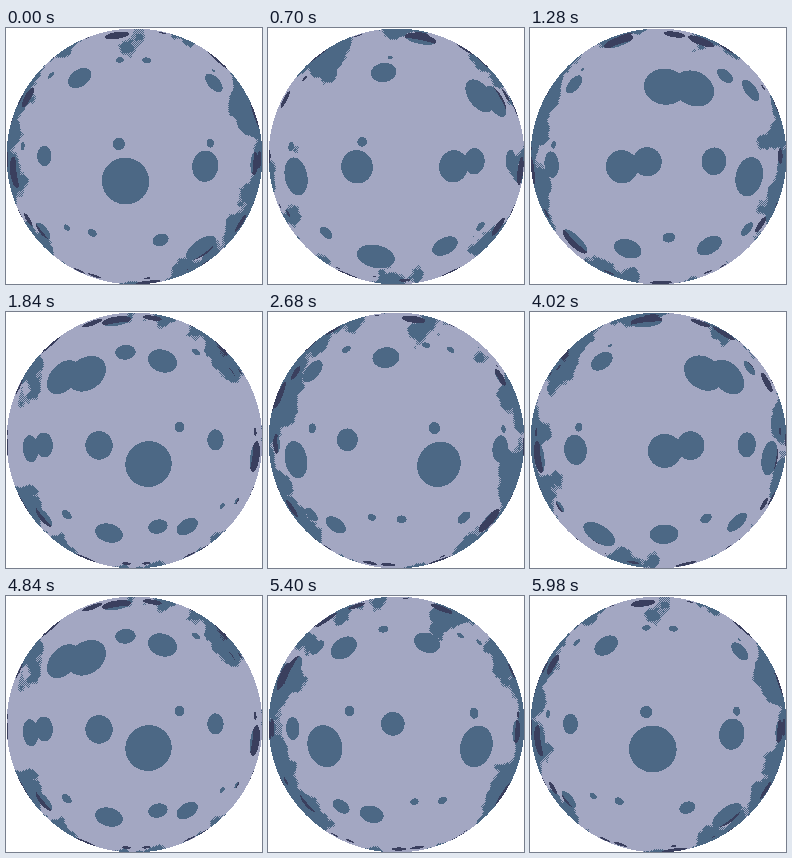
An HTML page with a canvas for the animation above (6 s loop, 256 by 256 pixels).

```html
<!DOCTYPE html>
<html lang="en">
<head>
<meta charset="utf-8">
<title>Rotating moon</title>
<style>
  html, body { margin: 0; height: 100%; overflow: hidden; background: #fff; }
  canvas { display: block; width: 100vw; height: 100vh; image-rendering: pixelated; }
</style>
</head>
<body>
<canvas id="stage" width="256" height="256"></canvas>
<script>
const SIZE = 256, LOOP = 6000, STEP = 20;
const SEED = 8.97;
const GROUND = 8, CRATERS = 5;          // tiles across the disc
const EDGE_MID = 0.615, EDGE_DARK = 0.729, CRATER_DARK = 0.465;
const DITHER = 2 / SIZE;

const rgb = (r, g, b) => (255 << 24 | b << 16 | g << 8 | r) >>> 0;
const LIGHT = rgb(0xa3, 0xa7, 0xc2), MID = rgb(0x4c, 0x68, 0x85), DARK = rgb(0x3a, 0x3f, 0x5e);

const fract = v => v - Math.floor(v);

// Random values on a grid of n by n that tiles in both directions
function grid(n) {
  const values = Array.from({ length: n * n }, (_, k) =>
    fract(Math.sin((k % n) * 12.9898 + Math.floor(k / n) * 78.233) * 15.5453 * SEED));
  return (x, y) => values[(y % n) * n + x % n];
}
const groundRand = grid(GROUND), craterRand = grid(CRATERS);

function noise(x, y) {
  const ix = Math.floor(x), iy = Math.floor(y);
  const fx = x - ix, fy = y - iy;
  const sx = fx * fx * (3 - 2 * fx), sy = fy * fy * (3 - 2 * fy);
  const a = groundRand(ix, iy), b = groundRand(ix + 1, iy);
  const c = groundRand(ix, iy + 1), d = groundRand(ix + 1, iy + 1);
  const top = a + (b - a) * sx, bottom = c + (d - c) * sx;
  return top + (bottom - top) * sy;
}

function fbm(x, y) {
  let sum = 0;
  for (let scale = 0.5; scale > 0.05; scale /= 2) {
    sum += noise(x, y) * scale;
    x *= 2;
    y *= 2;
  }
  return sum;
}

// 0 inside a crater, 1 outside; each tile holds one circle
function circleNoise(x, y) {
  const row = Math.floor(y);
  x += row * 0.31;
  const col = Math.floor(x), h = craterRand(col, row);
  const mid = 0.25 + h * 0.5, r = h * 0.25;
  const dist = Math.hypot(x - col - mid, y - row - mid);
  const s = Math.min(1, Math.max(0, (dist - 0.9 * r) / (0.1 * r)));
  return s * s * (3 - 2 * s);
}

function inCrater(x, y) {
  return circleNoise(x + 11, y + 11) * circleNoise(x + 12, y + 12) <= 0.5;
}

function groundColor(p, turn) {
  if (p.dist < EDGE_MID - 0.3) return LIGHT;
  const d = p.dist + 0.3 * fbm(p.gx + turn * GROUND, p.gy);
  if (d > EDGE_DARK) return d < EDGE_DARK + DITHER && p.even ? MID : DARK;
  if (d > EDGE_MID) return d < EDGE_MID + DITHER && p.even ? LIGHT : MID;
  return LIGHT;
}

// Everything about a pixel that does not depend on time
const pixels = [];
for (let y = 0; y < SIZE; y++) {
  for (let x = 0; x < SIZE; x++) {
    const u = x / SIZE, v = y / SIZE;
    const dist = Math.hypot(u - 0.5, v - 0.5);
    if (dist > 0.49999) continue;
    const bulge = 1 + Math.sqrt(1 - 4 * dist * dist);
    const warp = fbm(u, v);
    pixels.push({
      index: y * SIZE + x,
      even: (x + y) % 2 === 0,
      dist,
      gx: u * GROUND + warp,
      gy: v * GROUND + warp,
      cx: ((u - 0.5) / bulge + 0.5) * CRATERS,
      cy: ((v - 0.5) / bulge + 0.5) * CRATERS
    });
  }
}

const ctx = document.getElementById("stage").getContext("2d");
const image = ctx.createImageData(SIZE, SIZE);
const out = new Uint32Array(image.data.buffer);

function draw(turn) {
  for (const p of pixels) {
    out[p.index] = inCrater(p.cx + turn * CRATERS, p.cy)
      ? (p.dist > CRATER_DARK ? DARK : MID)
      : groundColor(p, turn);
  }
  ctx.putImageData(image, 0, 0);
}

let start, shown = -1;
function tick() {
  const now = performance.now();
  start ??= now;
  const step = Math.floor(((now - start) % LOOP) / STEP);
  if (step !== shown) {
    shown = step;
    draw(2 * step * STEP / LOOP);       // the surface passes twice per loop
  }
  requestAnimationFrame(tick);
}
tick();
</script>
</body>
</html>
```
